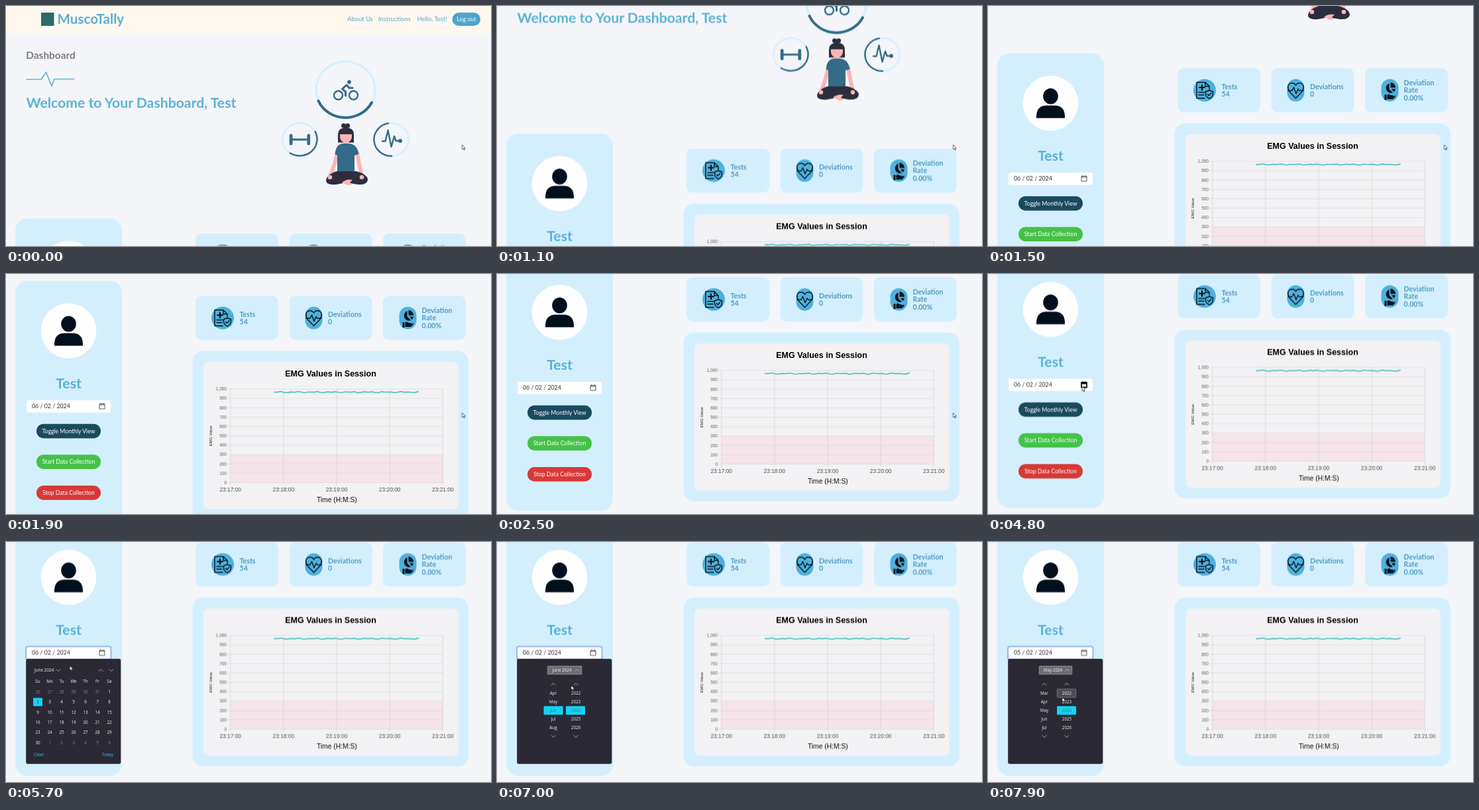
An HTML page that plays this animation: 732x363 px, repeating every 8 s.

```html
<!DOCTYPE html>
<html lang="en">
<head>
<meta charset="utf-8">
<title>Dashboard</title>
<style>
html, body { margin: 0; width: 100%; height: 100%; overflow: hidden; background: #f3f5f9; }
svg { display: block; width: 732px; height: 363px; font-family: Lato, sans-serif; }
.b { font-weight: 700; }
.m { text-anchor: middle; }
.e { text-anchor: end; }
.arial { font-family: "Liberation Sans", Arial, sans-serif; }
.ui { font: 6.3px "Open Sans", sans-serif; fill: #f2f2f4; }
.line { fill: none; stroke-linecap: round; stroke-linejoin: round; }

#page { animation: scroll 8s infinite; }
#cursor { animation: move 8s infinite; }
#ring { animation: ring 8s step-end infinite; }
#hot { animation: hot 8s step-end infinite; }
#days { animation: days 8s step-end infinite; }
.june { animation: june 8s step-end infinite; }
.may { animation: may 8s step-end infinite; }
#juneList { animation: juneList 8s step-end infinite; }
#hover { animation: hover 8s step-end infinite; }
#popup { animation: popup 8s step-end infinite; }

/* steps(n) keeps every pose for 100 ms */
@keyframes scroll {
  0% { transform: translateY(0); animation-timing-function: step-end; }
  10% { transform: translateY(0); animation-timing-function: steps(3); }
  13.75% { transform: translateY(-128.5px); animation-timing-function: steps(4); }
  18.75% { transform: translateY(-250px); animation-timing-function: steps(4); }
  23.75% { transform: translateY(-311px); animation-timing-function: steps(6); }
  31.25% { transform: translateY(-339px); animation-timing-function: step-end; }
  32.5%, 100% { transform: translateY(-343.5px); animation-timing-function: step-end; }
}
@keyframes move {
  0%, 32.5% { transform: translate(688.5px, 210px); animation-timing-function: steps(5); }
  38.75% { transform: translate(655px, 226px); animation-timing-function: step-end; }
  40% { transform: translate(655px, 226px); animation-timing-function: steps(6); }
  47.5% { transform: translate(240px, 285px); animation-timing-function: steps(4); }
  52.5% { transform: translate(118px, 204px); animation-timing-function: step-end; }
  53.75% { transform: translate(118px, 204px); animation-timing-function: steps(4); }
  58.75% { transform: translate(142px, 170px); animation-timing-function: step-end; }
  65% { transform: translate(142px, 170px); animation-timing-function: steps(7); }
  73.75% { transform: translate(78px, 194px); animation-timing-function: step-end; }
  78.75% { transform: translate(78px, 194px); animation-timing-function: steps(7); }
  87.5% { transform: translate(112px, 217px); animation-timing-function: step-end; }
  88.75% { transform: translate(112px, 217px); animation-timing-function: steps(3); }
  92.5% { transform: translate(85px, 213px); animation-timing-function: step-end; }
  93.75% { transform: translate(85px, 213px); animation-timing-function: steps(4); }
  98.75%, 100% { transform: translate(112px, 235px); animation-timing-function: step-end; }
}
@keyframes ring { 0% { opacity: 0; } 61.25%, 100% { opacity: 1; } }
@keyframes hot { 0% { opacity: 0; } 57.5% { opacity: 1; } 61.25%, 100% { opacity: 0; } }
@keyframes popup { 0% { opacity: 0; } 62.5%, 100% { opacity: 1; } }
@keyframes days { 0% { opacity: 0; } 62.5% { opacity: 1; } 78.75%, 100% { opacity: 0; } }
@keyframes juneList { 0% { opacity: 0; } 78.75% { opacity: 1; } 93.75%, 100% { opacity: 0; } }
@keyframes june { 0% { opacity: 1; } 93.75%, 100% { opacity: 0; } }
@keyframes may { 0% { opacity: 0; } 93.75%, 100% { opacity: 1; } }
@keyframes hover { 0% { opacity: 0; } 97.5%, 100% { opacity: 1; } }
</style>
</head>
<body>
<svg viewBox="0 0 732 363">
<rect width="732" height="363" fill="#f3f5f9"/>
<g id="page">
  <rect width="732" height="41" fill="#fef8ef"/>
  <rect x="53" y="10" width="19.5" height="20" fill="#2c6a6c"/>
  <text x="77.5" y="27.3" class="b" font-size="20.6" fill="#57b0d3">MuscoTally</text>
  <g font-size="9.4" fill="#55a7ca">
    <text x="515" y="23.2">About Us</text>
    <text x="562" y="23.2">Instructions</text>
    <text x="620.5" y="23.2">Hello, Test!</text>
  </g>
  <rect x="673.5" y="10" width="42.5" height="20" rx="10" fill="#4ca4ca"/>
  <text x="694.8" y="23" class="m" font-size="8.8" fill="#fff">Log out</text>

  <text x="30.3" y="79.5" class="b" font-size="15.4" fill="#7f7c86">Dashboard</text>
  <path class="line" d="M31 111H53L60.5 100 69 121.500 73 110.500H102.500" stroke="#5cb8d9" stroke-width="1.7"/>
  <text x="30.5" y="154" class="b" font-size="21.2" fill="#5bb3d6">Welcome to Your Dashboard, Test</text>

  <g class="line" stroke="#d3effd" stroke-width="3.2">
    <ellipse cx="512.5" cy="126" rx="44.5" ry="42"/>
    <g stroke-width="2.5">
      <ellipse cx="443.5" cy="202" rx="26.300" ry="25"/>
      <ellipse cx="581.5" cy="202" rx="26.300" ry="25"/>
    </g>
  </g>
  <g class="line" stroke="#336b88" stroke-width="2.4">
    <path d="M471.500 143.500A44.500 42 0 0 0 552 146" stroke-width="4"/>
    <path d="M466.600 190A26.300 25 0 0 1 429 222.500"/>
    <path d="M577 177.400A26.300 25 0 0 0 582 227"/>
    <circle cx="501.500" cy="135" r="6.500"/>
    <circle cx="524.500" cy="135" r="6.500"/>
    <path d="M512.500 135.500V129.500L507.500 125.500 514 119.500 518 124H523" stroke-width="3"/>
    <path d="M432 202H455" stroke-width="3"/>
    <path d="M568 204.500H572.500L576.500 188 581.500 213 586 197 588.500 204H594"/>
  </g>
  <g fill="#336b88">
    <circle cx="518" cy="115" r="2.900"/>
    <rect x="427.800" y="193.500" width="4.700" height="17" rx="2.200"/>
    <rect x="454.400" y="193.500" width="4.700" height="17" rx="2.200"/>
    <circle cx="595" cy="204" r="3"/>
  </g>

  <g fill="#2c2d3f">
    <circle cx="509.500" cy="181" r="3.500"/><circle cx="515.500" cy="181" r="3.600"/>
    <circle cx="512.500" cy="184" r="3.500"/>
    <path d="M501 206.500V195Q501 184 513 184T525 195V206.500Z"/>
  </g>
  <path d="M509.500 202H516.500V210H509.500ZM504 194H522V198A9 9 0 0 1 504 198Z" fill="#fbb6b3"/>
  <path class="line" d="M500 222Q496 241 489.500 257M530 222Q533 241 537 257" stroke="#fbb6b3" stroke-width="6"/>
  <path d="M508 208H518Q530 209 532.500 224L526 226V253H500V226L496.500 224Q498 209 508 208Z" fill="#336b88"/>
  <path d="M499 250H529Q546 255 546 263 545 271 531 270L514 267 498 270Q483 271 483 264 484 255 499 250Z" fill="#2c2d3f"/>
  <path d="M507 267Q514 261 523 263L519 267 523 270 516 271Z" fill="#fbb6b3"/>
  <circle cx="489" cy="259" r="3.300" fill="#fbb6b3"/><circle cx="537" cy="259" r="3.300" fill="#fbb6b3"/>

  <g transform="translate(0 311)">
    <g fill="#d3effe">
      <rect x="14" y="10.500" width="161" height="375.500" rx="18"/>
      <rect x="281.500" y="116.500" width="416.500" height="255.500" rx="16"/>
    </g>
    <circle cx="94.500" cy="86" r="41.800" fill="#fefeff"/>
    <g fill="#000f1c">
      <ellipse cx="94.500" cy="75.500" rx="11.300" ry="12"/>
      <path d="M73 108.500V105Q74 89.500 88 89.500H101Q115 89.500 116 105V108.500Z"/>
    </g>
    <text x="94.500" y="172.500" class="b m" font-size="21.200" fill="#58b1d5">Test</text>
    <rect x="31" y="191" width="127" height="18.500" rx="3" fill="#fff"/>
    <rect id="ring" x="30" y="190.500" width="128.500" height="20" rx="3" fill="none" stroke="#94b6f3" stroke-width="2"/>
    <g font-size="8.800" fill="#2f3035">
      <g class="june"><text x="39" y="203.300">06</text></g>
      <g class="may"><text x="39" y="203.300">05</text></g>
      <text x="51.500" y="203.300">/ 02 / 2024</text>
    </g>
    <path id="cal" d="M141 196.500H149V204H141ZM141 198H149M143 195V196.500M147 195V196.500" fill="none" stroke="#57585c"/>
    <use id="hot" href="#cal" style="stroke:#000"/>
    <path id="hotIcon" style="animation:hot 8s step-end infinite" d="M141 196.500H149V204H141ZM141 198H149" fill="none" stroke="#000" stroke-width="1.400"/>
    <g id="buttons" class="m" font-size="8.700"></g>

    <g id="cards"></g>
    <g class="line" stroke="#07131c" stroke-width="1.400">
      <path d="M327 78.500H315V54.500H328L334 60.500V65M328 54.500V60.500H334M318 69.500H327M318 73.500H326"/>
      <path d="M323 58.500V66M319.200 62.200H326.800" stroke-width="2.200"/>
      <path d="M334 66.500L339.500 68.500V72Q339 77 334 79 329 77 328.500 72V68.500ZM331.500 72.500L333.500 74.500 337 70.500"/>
      <path d="M464.500 78.500L455 68.500Q450 60 456 56 462 54 464.500 59 467 54 473 56 479 60 474 68.500Z"/>
      <path d="M453 67H459L461.500 62 465 71.500 468 64.500 469.500 67H476"/>
    </g>
    <g fill="#07131c">
      <path d="M605.500 56V64.500L611 70A7.500 7.500 0 1 1 605.500 56Z"/>
      <path d="M607.500 54.500A8 8 0 0 1 615 62.500H607.500ZM609 64.500H615Q614.500 67.500 612.500 69Z"/>
      <path d="M598.500 73H601.500V81H598.500ZM602.500 73.500Q605 71.500 608 74H611Q612 75.500 609.500 76.500L614.500 74Q616 75.500 611 80H602.500Z"/>
    </g>

    <rect x="298" y="133" width="385" height="222.500" rx="8" fill="#f2f1f3"/>
    <g class="arial">
      <text x="490" y="155.200" class="b m" font-size="12.500">EMG Values in Session</text>
      <rect x="338.700" y="273" width="320.600" height="42.500" fill="#f5e4ea"/>
      <g id="axes"></g>
      <text x="499.300" y="344.800" class="m" font-size="10.300" fill="#111">Time (H:M:S)</text>
      <text transform="translate(311.300 245) rotate(-90)" class="m" font-size="6.200" fill="#222">EMG Value</text>
    </g>
    <polyline id="trace" class="line" stroke="#4bc2c6" stroke-width="1.700"/>
  </g>
</g>

<g id="popup">
  <rect x="30.500" y="177" width="142.500" height="158.300" rx="2" fill="#2b2933" stroke="#1f1e27" stroke-width=".6"/>
  <g id="days" class="ui"></g>
  <g id="juneList" class="ui m"></g>
  <g class="may"><g id="mayList" class="ui m"></g></g>
</g>
<path id="cursor" d="M0 0V6.800L1.600 5.400 2.800 8 3.900 7.500 2.800 5H4.900Z" fill="#fff" stroke="#222" stroke-width=".7"/>
</svg>
<script>
const $ = id => document.getElementById(id);
const text = (x, y, s, attrs = "") => `<text x="${x}" y="${y}" ${attrs}>${s}</text>`;
const box = (x, y, w, h, fill, rx = 0, attrs = "") =>
  `<rect x="${x}" y="${y}" width="${w}" height="${h}" rx="${rx}" fill="${fill}" ${attrs}/>`;
const path = (d, stroke, width) => `<path class="line" d="${d}" stroke="${stroke}" stroke-width="${width}"/>`;
const chevron = (x, y, dir = 1, color = "#bdbdc4") =>
  path(`M${x - 3} ${y + 1.5 * dir}L${x} ${y - 1.5 * dir} ${x + 3} ${y + 1.5 * dir}`, color, 0.8);

$("buttons").innerHTML = [
  ["Toggle Monthly View", 226.7, "#1a4a5e"],
  ["Start Data Collection", 273.2, "#45c148"],
  ["Stop Data Collection", 320, "#d73a37"]
].map(([s, y, fill]) => box(46, y, 97, 21.7, fill, 10.8) + text(94.5, y + 13.8, s, 'fill="#fff"')).join("");

$("cards").innerHTML = [
  [286, 327, 17, 352.5, ["Tests", "54"]],
  [427.5, 464.5, 13, 486, ["Deviations", "0"]],
  [569, 606.5, 13, 627.5, ["Deviation", "Rate", "0.00%"]]
].map(([x, cx, rx, tx, lines]) =>
  box(x, 33, 125, 66.7, "#d3effe", 9) +
  box(cx - rx, 49.5, rx * 2, 34, "#50b0db", rx) +
  lines.map((s, i) => text(tx, 76.3 + (i - lines.length / 2) * 11.8, s,
    'class="b" font-size="10.6" fill="#4f9bc0"')).join("").replace(/y="([\d.]+)"/g,
    (_, y) => `y="${(+y).toFixed(1)}"`)
).join("");

let axes = "";
for (let i = 0; i <= 10; i++) {
  const y = 315.5 - i * 14.15;
  axes += path(`M335 ${y}H659.300`, "#d9d8db", 0.7) +
    text(333, y + 2.3, (i * 100).toLocaleString("en-US"), 'class="e" font-size="6.5" fill="#666"');
}
for (let i = 0; i < 5; i++) {
  const x = 338.7 + i * 80.15;
  axes += path(`M${x} 174V319`, "#d3d2d5", 0.7) +
    text(x, 329.2, `23:${17 + i}:00`, 'class="m" font-size="8.4" fill="#555"');
}
$("axes").innerHTML = axes;

$("trace").setAttribute("points", Array.from({ length: 44 }, (_, i) =>
  `${405 + i * 5.05},${178.7 + Math.sin(i * 2.3) * 0.6 + Math.sin(i * 5.1) * 0.5}`).join(" "));

// Calendar: day grid, starting on Sunday 26 May
let days = text(43, 196.3, "June 2024") + chevron(79, 194, -1) + chevron(143, 194) + chevron(159, 194, -1);
["Su", "Mo", "Tu", "We", "Th", "Fr", "Sa"].forEach((d, i) => {
  days += text(48 + i * 18, 213, d, 'class="m"');
});
for (let i = 0; i < 42; i++) {
  const x = 48 + i % 7 * 18, y = 229 + Math.floor(i / 7) * 15.3;
  const n = i < 6 ? 26 + i : (i - 6) % 30 + 1;
  const out = i < 6 || i > 35;
  if (i === 7) days += box(x - 7, y - 8.5, 14, 12.5, "#14d2f5", 1);
  days += text(x, y, n, `class="m" fill="${i === 7 ? "#26343c" : out ? "#85838d" : "#f2f2f4"}"`);
}
$("days").innerHTML = days + text(42, 324, "Clear", 'fill="#14d2f5"') +
  text(162, 324, "Today", 'class="e" fill="#14d2f5"');

// Calendar: month and year columns
const months = ["Mar", "Apr", "May", "Jun", "Jul", "Aug"];
function picker(title, left, width, first, pickMonth) {
  let out = box(left, 187.8, width, 12.3, "#6c6b71", 0.5, 'stroke="#a9a8ad" stroke-width=".7"') +
    text(left + width / 2 - 4, 196.4, title) + chevron(left + width - 7, 194, 1, pickMonth ? "#62cfe3" : "#bdbdc4");
  if (pickMonth) out += box(70.5, 248.2, 29, 13, "#14d2f5", 1);
  else out += `<g id="hover">${box(104.3, 222.3, 28.5, 12.8, "#4d4b54", 1, 'stroke="#8b8a90" stroke-width=".7"')}</g>`;
  out += box(104, 248.2, 29, 13, "#14d2f5", 1);
  for (const x of [85, 119]) out += chevron(x, 215) + chevron(x, 294, -1);
  for (let i = 0; i < 5; i++) {
    const y = 231.2 + i * 13;
    out += text(85, y, months[first + i], i === 2 && pickMonth ? 'style="fill:#407784"' : "") +
      text(119, y, 2022 + i, i === 2 ? 'style="fill:#407784"' : "");
  }
  return out;
}
$("juneList").innerHTML = picker("June 2024", 76.3, 51.4, 1, true);
$("mayList").innerHTML = picker("May 2024", 77.3, 49.4, 0, false);
</script>
</body>
</html>
```
